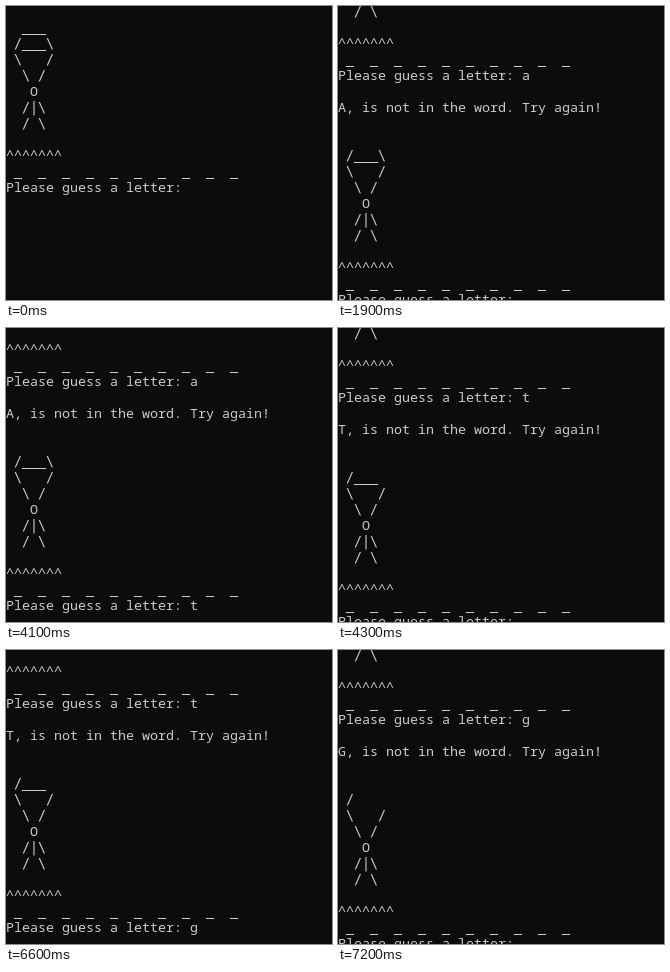
An HTML page that plays this animation: 326x294 px, repeating every 8000 ms.

```html
<!DOCTYPE html>
<html lang="en">
<head>
<meta charset="utf-8">
<title>Hangman console</title>
<style>
  html, body { margin: 0; width: 100%; height: 100%; overflow: hidden; background: #0c0c0c; }
  svg { display: block; width: 326px; height: 294px; }
  text { white-space: pre; fill: #ccc; font: 13.333px "Noto Sans Mono", monospace; }
  .slash, .blank { font: 13.29px "DejaVu Sans Mono", monospace; }
  .blank { stroke: #ccc; stroke-width: .35px; }

  #log, #turn1, #cursor, .guess { animation: 8s step-end infinite; }
  #log { animation-name: scroll; }
  #turn1 { animation-name: print; }
  #cursor { fill: #f2f2f2; animation-name: cursor; }
  #turn0 .guess { animation-name: key-a; }
  #turn1 .guess { animation-name: key-t; }
  #turn2 .guess { animation-name: key-g; }

  /* Each Enter scrolls one line, then the next turn is printed at once. */
  @keyframes scroll {
    0% { transform: translateY(0); }
    20% { transform: translateY(-112px); }
    51.25% { transform: translateY(-128px); }
    53.75% { transform: translateY(-336px); }
    82.5% { transform: translateY(-352px); }
    85%, 100% { transform: translateY(-560px); }
  }
  @keyframes print { 0% { opacity: 0; } 20%, 100% { opacity: 1; } }
  @keyframes key-a { 0% { opacity: 0; } 10%, 100% { opacity: 1; } }
  @keyframes key-t { 0% { opacity: 0; } 46.25%, 100% { opacity: 1; } }
  @keyframes key-g { 0% { opacity: 0; } 72.5%, 100% { opacity: 1; } }
  @keyframes cursor {
    0% { opacity: 0; transform: translate(192px, 185px); }
    10% { opacity: 1; transform: translate(192px, 185px); }
    17.5% { opacity: 1; transform: translate(0, 201px); }
    20%, 100% { opacity: 0; transform: translate(0, 201px); }
  }
</style>
</head>
<body>
<svg viewBox="0 0 326 294">
  <g id="log"></g>
  <rect id="cursor" width="8" height="4"/>
</svg>
<script>
  const SVG = "http://www.w3.org/2000/svg";
  const CELL = 8, LINE = 16, BASELINE = 10, TURN_ROWS = 14;
  const guesses = ["a", "t", "g"];
  const canopies = [
    ["  ___", " /___\\"],
    ["", " /___\\"],
    ["", " /___"],
    ["", " /"]
  ];
  const jumper = [" \\   /", "  \\ /", "   O", "  /|\\", "  / \\"];

  // Drawing characters sit on their own layers, each with its own style.
  const layers = [
    { kind: "letter", others: /[\/\\|_^]/g, shift: 0 },
    { kind: "slash", others: /[^\/\\|]/g, shift: -0.5 },
    { kind: "blank", others: /[^_]/g, shift: -1.5 },
    { kind: "caret", others: /[^^]/g, shift: -1 }
  ];

  function add(parent, tag, attributes, content = "") {
    const node = document.createElementNS(SVG, tag);
    for (const [name, value] of Object.entries(attributes)) node.setAttribute(name, value);
    node.textContent = content;
    return parent.appendChild(node);
  }

  function write(parent, row, line, column = 0) {
    for (const { kind, others, shift } of layers) {
      const content = line.replace(others, " ");
      if (!content.trim()) continue;
      add(parent, "text", {
        x: column * CELL,
        y: BASELINE + row * LINE + shift,
        class: kind
      }, content);
    }
  }

  canopies.forEach((canopy, turn) => {
    const group = add(document.getElementById("log"), "g", { id: "turn" + turn });
    const top = turn * TURN_ROWS;
    if (turn) {
      const letter = guesses[turn - 1].toUpperCase();
      write(group, top - 1, `${letter}, is not in the word. Try again!`);
    }
    [...canopy, ...jumper].forEach((line, i) => write(group, top + 1 + i, line));
    write(group, top + 9, "^".repeat(7));
    write(group, top + 10, " _ ".repeat(10));
    write(group, top + 11, "Please guess a letter: ");
    if (guesses[turn]) {
      write(add(group, "g", { class: "guess" }), top + 11, guesses[turn], 23);
    }
  });
</script>
</body>
</html>
```
